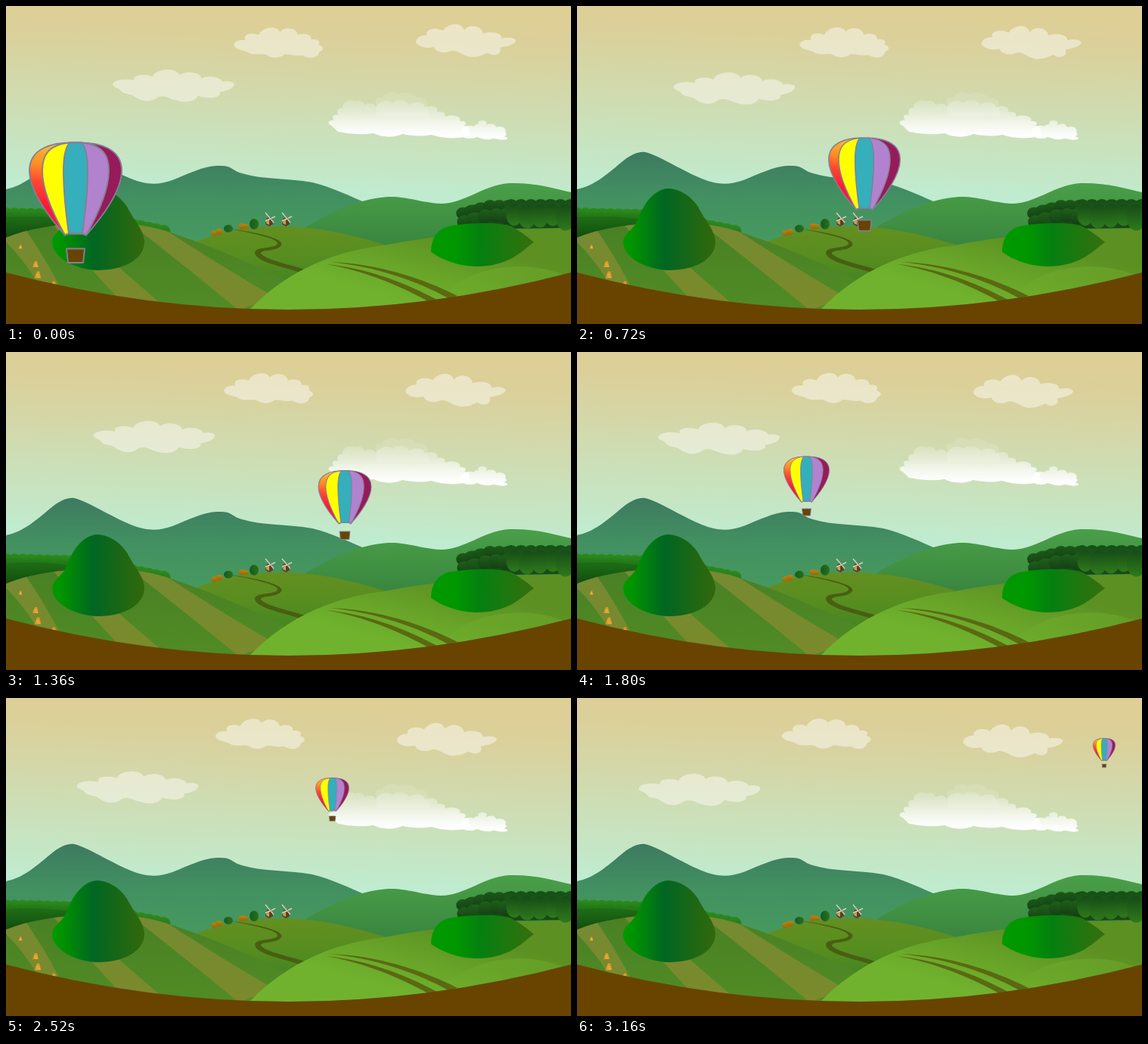
Recreate the animation shown at these times as an HTML page with a canvas. Size 747 by 420 pixels, loop 3200 ms.

```html
<!DOCTYPE html>
<html lang="en">
<head>
<meta charset="utf-8">
<title>Balloon over the hills</title>
<style>
html, body { margin: 0; width: 100%; height: 100%; overflow: hidden; background: #684400; }
canvas { display: block; width: 747px; height: 420px; }
</style>
</head>
<body>
<canvas id="stage" width="747" height="420"></canvas>
<script>
const W = 747, H = 420, LOOP = 3200, STEP = 40, LAST = 3160;
const view = document.getElementById('stage').getContext('2d');
const backdrop = document.createElement('canvas');
backdrop.width = W;
backdrop.height = H;
let g = backdrop.getContext('2d');

// Linear gradient with evenly spaced stops, or explicit [offset, colour] pairs
function ramp(x0, y0, x1, y1, ...stops) {
  const r = g.createLinearGradient(x0, y0, x1, y1);
  stops.forEach((s, i) => Array.isArray(s)
    ? r.addColorStop(s[0], s[1])
    : r.addColorStop(i / (stops.length - 1), s));
  return r;
}

function fill(d, style) {
  g.fillStyle = style;
  g.fill(new Path2D(d));
}

function stroke(d, style, width) {
  g.strokeStyle = style;
  g.lineWidth = width;
  g.stroke(new Path2D(d));
}

function ball(x, y, rx, ry, style) {
  g.fillStyle = style;
  g.beginPath();
  g.ellipse(x, y, rx, ry, 0, 0, Math.PI * 2);
  g.fill();
}

function seeded(seed) {
  return () => (seed = (seed * 16807) % 2147483647) / 2147483647;
}

// A row of overlapping shrubs following a top edge
function shrubs(x0, x1, top, gap, rx, ry, light, dark, seed) {
  const rnd = seeded(seed);
  for (let x = x0; x < x1; x += gap) {
    const k = 0.88 + rnd() * 0.24, r = ry * k, y = top(x) + r;
    ball(x, y, rx * k, r, ramp(0, y - r, 0, y + r, light, dark));
  }
}

function sky() {
  g.fillStyle = ramp(0, 0, -8, 262, [0, '#ddcf96'], [0.12, '#dbd09a'],
    [0.45, '#d0dbb0'], [0.75, '#c5e6c5'], [0.95, '#bdeed3'], [1, '#bdeed3']);
  g.fillRect(0, 0, W, H);
}

function bigCloud() {
  fill('M489 129 C487 121 494 120 497 122 C500 113 512 112 517 116 C526 113 540 114 543 121 ' +
    'C553 119 560 126 557 132 L560 145 L490 145 Z',
    ramp(0, 113, 0, 146, 'rgba(255,255,255,.1)', 'rgba(255,255,255,.17)'));
  fill('M427 156 C425 151 431 150 434 151 C429 145 434 142 439 144 C436 136 442 134 445 135 ' +
    'C444 127 454 122 461 126 C469 123 474 128 474 131 C480 127 488 129 489 134 ' +
    'C494 123 508 124 511 128 C519 121 531 125 533 131 C542 124 553 128 554 134 ' +
    'C564 129 573 134 570 140 C579 138 582 143 580 146 C591 142 603 146 600 152 ' +
    'C609 151 610 157 605 158 C615 159 613 164 611 165 C617 168 613 174 606 173 ' +
    'C590 176 574 174 562 170 C548 173 535 171 524 169 C511 175 496 173 486 168 ' +
    'C469 171 449 168 439 166 C435 163 434 160 427 156 Z',
    ramp(0, 124, 0, 171, 'rgba(255,255,255,.18)', 'rgba(255,255,255,.42)',
      'rgba(255,255,255,.75)', '#fff'));
  fill('M600 169 C603 158 612 156 618 159 C622 154 628 157 628 160 C621 154 625 151 630 151 ' +
    'C636 151 637 155 634 158 C640 154 647 155 648 160 C657 157 663 163 660 167 ' +
    'C664 169 660 172 658 172 C662 173 665 175 662 176 C655 178 649 175 644 175 ' +
    'C637 178 629 175 622 173 C616 177 603 175 600 169 Z',
    ramp(0, 150, 0, 174, 'rgba(255,255,255,.5)', '#fff'));
}

function farHills() {
  fill('M0 242 C22 238 40 222 58 207 C70 197 80 192 90 193 C106 196 138 217 165 228 ' +
    'C185 236 200 237 220 230 C240 222 260 212 278 211 C301 210 297 217 312 221 ' +
    'C337 229 370 227 405 233 C430 239 455 251 480 262 L480 345 H0 Z',
    ramp(0, 192, 0, 310, '#3d7a60', '#429061', '#46995f'));
  fill('M396 292 C430 272 465 255 505 252 C530 251 545 259 575 261 C606 261 630 237 665 234 ' +
    'C700 233 725 241 747 246 V330 H480 Z',
    ramp(0, 234, 0, 316, '#4a9f49', '#429343', '#3a8540'));
}

function leftForest() {
  const edge = x => 266 + x * 0.025;
  shrubs(0, 92, edge, 11, 9, 8, '#2c8c1b', '#217416', 17);
  shrubs(5, 92, x => edge(x) + 6, 13, 10, 9, '#26801a', '#1a6413', 31);
  fill('M0 279 Q45 275 92 283 L100 310 H0 Z', ramp(0, 276, 0, 305, '#1f7016', '#124e0e'));
  shrubs(168, 212, x => 281 + (x - 168) * 0.2, 10, 9, 8, '#2e8a1d', '#24721a', 5);
}

function windmill(x, y) {
  g.save();
  g.translate(x, y);
  fill('M-4 -3 L2 -4 L4 5 L-1 8 L-6 5 Z', '#5e3d20');
  fill('M-4 -1 L-1 -2 L-1 6 L-5 4 Z', '#c9a24a');
  stroke('M-6 -10 L5 3 M7 -5 L-6 1', '#d9d7c3', 1.4);
  stroke('M-5 -10 L6 3 M7 -4 L-6 2', '#8b877b', 0.6);
  g.restore();
}

function midHill() {
  fill('M225 325 C260 303 310 290 365 291 C430 292 475 308 520 321 L430 400 H250 Z',
    ramp(0, 290, 0, 375, '#648f20', '#578d20', '#3d8222'));
  fill('M288 293 C320 297 370 306 364 316 C358 325 336 321 337 327 C345 336 375 341 405 351 ' +
    'L396 354 C365 344 330 338 329 326 C329 317 356 321 359 314 C361 307 322 299 288 293 Z', '#485f12');
  for (const [x, y, r] of [[276, 300, 5], [282, 298, 5], [312, 291, 5], [317, 291, 4]])
    ball(x, y, r, r * 0.75, ramp(0, y - r, 0, y + r, '#c08a12', '#8b6408'));
  ball(294, 294, 6, 5, ramp(288, 0, 300, 0, '#155c22', '#2c7019'));
  ball(328, 288, 6, 7, ramp(322, 0, 334, 0, '#115a20', '#2c7019'));
  windmill(349, 283);
  windmill(371, 283);
}

function field() {
  const shape = 'M0 306 C30 294 65 288 105 287 C150 284 190 289 220 300 C275 318 335 345 400 376 L390 410 H0 Z';
  fill(shape, ramp(0, 288, 0, 395, '#4a8024', '#508b25'));
  g.save();
  g.clip(new Path2D(shape));
  const olive = ramp(0, 288, 0, 395, '#758a32', '#7a8a2c');
  fill('M-20 295 L25 294 Q50 330 72 372 L42 366 Q22 332 -6 306 Z', olive);
  fill('M60 286 L82 284 Q138 337 212 399 L158 396 Q106 342 60 286 Z', olive);
  fill('M160 284 L196 286 Q270 335 354 384 L308 402 Q230 338 160 284 Z', olive);
  g.restore();
  for (const [x, y, s] of [[19, 318, 0.6], [39, 341, 1], [42, 355, 1.1], [63, 367, 0.9]]) {
    fill(`M${x - 4 * s} ${y + 4 * s} L${x - s} ${y - 4 * s} L${x + 2 * s} ${y - 4 * s} L${x + 4 * s} ${y + 4 * s} Z`, '#d89b26');
    stroke(`M${x - 2 * s} ${y} h${4 * s} M${x - s} ${y + 2.5 * s} h${4 * s}`, '#f0c45c', 0.8);
  }
}

function rightHill() {
  fill('M318 405 C375 345 440 323 500 316 C560 304 590 304 640 297 C680 295 720 294 747 293 V420 H318 Z',
    ramp(560, 298, 535, 392, '#5c9022', '#67a328', '#70b22e'));
  fill('M575 385 C610 345 680 334 735 354 L747 380 Z',
    ramp(0, 340, 0, 380, 'rgba(120,180,48,.4)', 'rgba(115,180,46,.1)'));
  fill('M428 338 C490 340 550 359 597 383 L585 386 C545 364 490 344 428 338 Z', '#5b6911');
  fill('M423 341 C475 346 523 363 572 389 L558 390 C520 369 475 350 423 341 Z', '#5b6911');
}

function rightForest() {
  const top = x => 256 + Math.max(0, 640 - x) * 0.27;
  fill('M597 289 L602 272 L615 263 L747 257 V293 L672 294 L660 290 Z', '#174a17');
  shrubs(604, 670, top, 12, 10, 9, '#1c5a18', '#133f15', 29);
  shrubs(606, 672, x => top(x) + 11, 14, 11, 10, '#1f6019', '#143f15', 7);
  shrubs(668, 756, () => 255, 13, 10, 10, '#174f17', '#1b5a18', 43);
  shrubs(672, 760, () => 262, 17, 12, 16, '#164b16', '#2f7a1c', 11);
}

function bigTrees() {
  fill('M120 241 C100 243 88 262 80 283 C74 297 61 300 61 313 C62 332 90 348 122 349 ' +
    'C155 349 183 335 183 311 C182 295 170 285 160 265 C150 250 135 241 120 241 Z',
    ramp(61, 0, 183, 0, [0, '#009900'], [0.1, '#009400'], [0.45, '#006622'], [1, '#33680b']));
  fill('M562 325 C562 310 568 293 590 290 C620 286 655 285 670 292 Q684 300 698 312 ' +
    'C680 325 665 344 620 344 C595 343 575 334 562 325 Z',
    ramp(562, 0, 698, 0, [0, '#009900'], [0.25, '#009600'], [0.48, '#048010'], [1, '#376e0d']));
}

function ground() {
  fill('M0 352 Q373.5 450 747 352 V420 H0 Z', '#684400');
}

// Drifting clouds: outline in a unit box, place, size and drift over one loop
const clouds = [
  { x: 141, y: 84, w: 161, h: 43, dx: -59.4, dy: 16, d:
    'M0 .44 C.02 .3 .11 .27 .18 .33 C.15 .15 .28 .12 .33 .22 C.34 -.02 .52 -.1 .55 .17 ' +
    'C.59 .02 .72 .06 .73 .27 C.8 .14 .9 .26 .9 .37 C.97 .34 1.02 .4 .99 .52 ' +
    'C.98 .61 .93 .66 .88 .69 C.9 .86 .79 .92 .7 .81 C.68 .98 .6 1.03 .53 .95 ' +
    'C.46 .89 .44 .78 .38 .83 C.31 1.02 .25 1 .18 .83 C.15 .72 .09 .78 .06 .62 C.05 .55 0 .55 0 .44 Z' },
  { x: 301, y: 28, w: 118, h: 41, dx: -30.5, dy: -1.3, d:
    'M0 .57 C.02 .42 .08 .4 .13 .42 C.1 .22 .2 .16 .28 .25 C.32 .0 .47 -.08 .52 .15 ' +
    'C.57 -.04 .71 .02 .72 .25 C.8 .16 .88 .24 .87 .4 C.95 .36 .98 .48 .95 .57 ' +
    'C1.01 .6 1.02 .74 .96 .8 C.95 1 .84 1.04 .77 .9 C.69 .96 .63 .84 .57 .88 ' +
    'C.52 1 .43 1.02 .38 .9 C.32 .82 .26 .92 .18 .84 C.12 .72 .02 .76 0 .57 Z' },
  { x: 542, y: 24, w: 132, h: 44, dx: -31.5, dy: 11, d:
    'M0 .55 C0 .38 .07 .32 .11 .33 C.08 .16 .2 .06 .27 .2 C.33 -.06 .46 -.06 .48 .18 ' +
    'C.54 -.02 .66 .04 .67 .28 C.76 .2 .86 .26 .86 .42 C.92 .38 1 .4 1 .5 ' +
    'C.99 .62 .9 .68 .84 .7 C.87 .9 .78 1 .72 .86 C.66 .94 .6 1.02 .53 .98 ' +
    'C.44 .9 .42 .78 .35 .8 C.28 .9 .2 .84 .18 .68 C.1 .74 .03 .68 0 .55 Z' }
];

function drawCloud(c, k) {
  g.save();
  g.translate(c.x + c.dx * k, c.y + c.dy * k);
  g.scale(c.w, c.h);
  fill(c.d, 'rgba(250,248,240,.54)');
  g.restore();
}

// Smooth curve through [time, value] points that never overshoots them
function curve(pts) {
  const n = pts.length - 1;
  const slope = i => (pts[i + 1][1] - pts[i][1]) / (pts[i + 1][0] - pts[i][0]);
  const tan = pts.map((p, i) => {
    if (i === 0) return slope(0);
    if (i === n) return slope(n - 1);
    const a = slope(i - 1), b = slope(i);
    return a * b <= 0 ? 0 : 2 * a * b / (a + b);
  });
  return t => {
    let i = 0;
    while (i < n - 1 && t > pts[i + 1][0]) i++;
    const [t0, a] = pts[i], [t1, b] = pts[i + 1];
    const d = t1 - t0, u = (t - t0) / d, v = 1 - u;
    return a * v * v * (1 + 2 * u) + b * u * u * (1 + 2 * v) + d * u * v * (tan[i] * v - tan[i + 1] * u);
  };
}

const flyX = curve([[40, 81.5], [320, 198], [720, 380], [1075, 529], [1360, 448],
  [1800, 303.5], [2050, 247], [2520, 431.5], [3160, 697]]);
const flyY = curve([[40, 270], [320, 251.5], [720, 235.5], [1360, 202], [1800, 177],
  [2520, 134], [2800, 117], [3160, 72.5]]);
const size = t => (t < 1360 ? 124 - 53 * t / 1360 : 71 - 41 * (t - 1360) / 1800) / 124;

const envelope = 'M0 -79 C-32 -80 -61 -71 -61 -42 C-61 -15 -34 21 -14 43 L-9 41 H9 L14 43 ' +
  'C34 21 61 -15 61 -42 C61 -71 32 -80 0 -79 Z';
const panels = [
  ['M8 -79 C38 -76 44 -60 44 -42 C44 -14 27 20 14 43 L9 41 H0 V-79 Z', '#b183cf'],
  ['M-8 -79 C-38 -76 -44 -60 -44 -42 C-44 -14 -27 20 -14 43 L-9 41 H0 V-79 Z', '#ffff00'],
  ['M-8 -79 C-14 -72 -16 -58 -16 -42 C-16 -10 -12 20 -9 41 H9 C12 20 16 -10 16 -42 C16 -58 14 -72 8 -79 Z', '#34afbb']
];
const basket = 'M-12 61 H12 L10 79.5 H-10 Z';

function drawBalloon(t) {
  const s = size(t), line = '#877e98', lw = Math.max(1.9, 0.7 / s);
  g.save();
  g.translate(t < STEP ? 92 : flyX(t), t < STEP ? 259.5 : flyY(t));
  g.scale(s, s);
  g.lineJoin = 'round';
  fill(envelope, '#961b59');
  g.save();
  g.clip(new Path2D(envelope));
  g.fillStyle = ramp(-35, -72, -46, 5, [0, '#ffb42a'], [0.3, '#ff8c25'], [0.6, '#ff4630'], [1, '#ff1738']);
  g.fillRect(-64, -82, 64, 128);
  g.restore();
  for (const [d, colour] of panels) {
    fill(d, colour);
    stroke(d, line, lw);
  }
  stroke(envelope, line, lw);
  fill(basket, '#684400');
  stroke(basket, line, lw);
  g.restore();
}

[sky, bigCloud, farHills, leftForest, midHill, field, rightHill, rightForest, bigTrees, ground].forEach(f => f());
g = view;

const start = performance.now();
function frame() {
  const t = Math.floor(((performance.now() - start) % LOOP) / STEP) * STEP;
  g.drawImage(backdrop, 0, 0);
  clouds.forEach(c => drawCloud(c, t / LAST));
  drawBalloon(t);
  requestAnimationFrame(frame);
}
frame();
</script>
</body>
</html>
```
